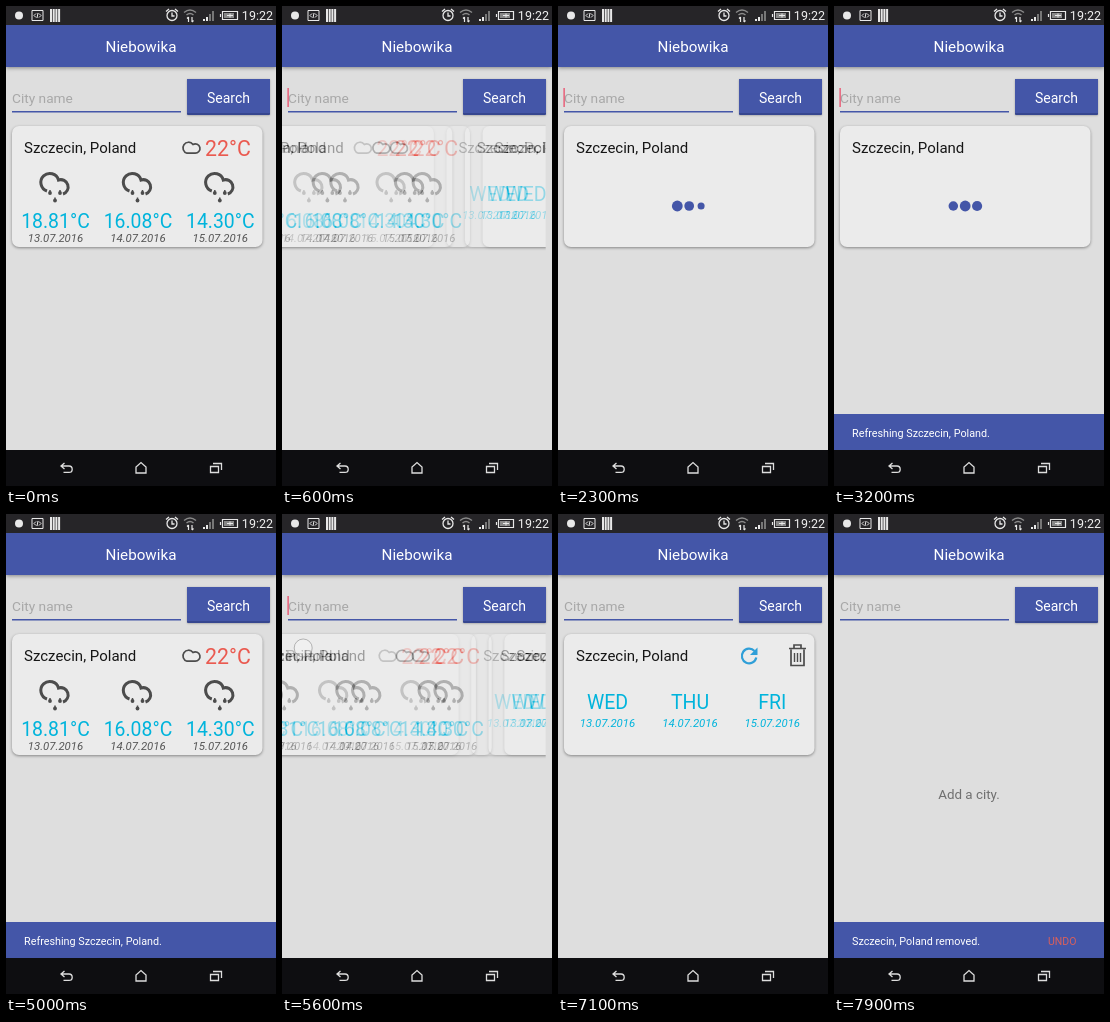
Write an HTML page with a canvas that moves like this. It is 270 px wide and 480 px high and loops after 8 s.

```html
<!DOCTYPE html>
<html lang="en">
<head>
<meta charset="utf-8">
<style>
html, body { margin: 0; height: 100%; overflow: hidden; background: #000; }
canvas { display: block; width: 270px; height: 480px; }
</style>
</head>
<body>
<canvas id="stage"></canvas>
<script>
const LOOP = 8000, PAGE = 263;
const BLUE = '#4456a8', CYAN = '#00b4dc', RED = '#ea5a50', DARK = '#4c4c4c', PAPER = '#dedede';
const COLUMNS = [49.5, 132, 214.3];
const DATES = ['13.07.2016', '14.07.2016', '15.07.2016'];
const TEMPS = ['18.81°C', '16.08°C', '14.30°C'];
const DAYS = ['WED', 'THU', 'FRI'];
const SWIPES = [450, 5473], SWIPE_MS = 350;
const REFRESH = 2300, LOADED = 4100, REMOVED = 7250;

const ratio = window.devicePixelRatio || 1;

function context(canvas) {
  canvas.width = 270 * ratio;
  canvas.height = 480 * ratio;
  const result = canvas.getContext('2d');
  result.scale(ratio, ratio);
  return result;
}

const screen2d = context(document.getElementById('stage'));
const layer2d = context(document.createElement('canvas'));
let ctx = screen2d;

const clamp = u => Math.max(0, Math.min(1, u));
const smooth = u => u * u * (3 - 2 * u);

function text(str, x, y, size, color, align = 'left', style = '') {
  ctx.font = `${style} ${size}px Roboto, sans-serif`;
  ctx.textAlign = align;
  ctx.fillStyle = color;
  ctx.fillText(str, x, y);
}

function rect(x, y, w, h, color) {
  ctx.fillStyle = color;
  ctx.fillRect(x, y, w, h);
}

function round(x, y, w, h, r, color) {
  ctx.beginPath();
  ctx.roundRect(x, y, w, h, r);
  ctx.fillStyle = color;
  ctx.fill();
}

function dot(x, y, r, color) {
  ctx.beginPath();
  ctx.arc(x, y, r, 0, 7);
  ctx.fillStyle = color;
  ctx.fill();
}

function line(d, color, width) {
  ctx.strokeStyle = color;
  ctx.lineWidth = width;
  ctx.stroke(new Path2D(d));
}

function at(x, y, draw) {
  ctx.save();
  ctx.translate(x, y);
  draw();
  ctx.restore();
}

function shadowed(blur, dy, color, draw) {
  ctx.save();
  ctx.shadowBlur = blur * ratio;
  ctx.shadowOffsetY = dy * ratio;
  ctx.shadowColor = color;
  draw();
  ctx.restore();
}

function statusBar() {
  const white = '#e8e8e8';
  rect(0, 0, 270, 19, '#262528');
  dot(13, 9.5, 4, white);
  line('M26 4.5h11v10h-11zM30 7.5l-2 2 2 2M33 7.5l2 2-2 2M32 7l-1 5', white, 1);
  for (let x = 44; x < 54; x += 2.7) rect(x, 3, 2, 13, white);
  line('M161 9.5a5 5 0 1 0 10 0a5 5 0 1 0-10 0M166 6.5v3.5h2.5M160 5.5l3-2.5M172 5.5l-3-2.5', white, 1.3);
  line('M178 6.5q6-5 12 0M180.5 9q3.5-3 7 0', '#8a8a8a', 1.4);
  line('M182.5 11v5M181 12.5l1.5-1.5M186 11v5M187.5 14.5l-1.5 1.5', white, 1.2);
  [2, 4, 7, 10].forEach((h, i) => rect(197 + i * 3, 15 - h, 2, h, i < 2 ? white : '#777'));
  line('M216.5 5.5h15v8h-15zM214.5 8v3', white, 1.2);
  rect(218, 7, 10, 5, '#888');
  line('M221 9.5h6M224 7.5v4', white, 1);
  text('19:22', 267, 14, 12.5, '#f0f0f0', 'right');
}

function navBar() {
  rect(0, 444, 270, 36, '#0e0e11');
  line('M58.5 457l-3.5 3 3.5 3M55 460h8a3.2 3.2 0 0 1 0 6.4h-5.5', '#ddd', 1.3);
  line('M130 467v-6l5-4.5 5 4.5v6z', '#ddd', 1.3);
  line('M204.5 460.5h8v6h-8zM207 457.5h8.5v6.5', '#ddd', 1.3);
}

function header(t) {
  shadowed(4, 1, 'rgba(0,0,0,.4)', () => rect(0, 19, 270, 42, BLUE));
  text('Niebowika', 135, 46, 15.2, '#fff', 'center');
  text('City name', 6, 96.5, 13.7, '#a8a8a8');
  rect(6, 105, 169, 1.5, BLUE);
  const blink = t % 1000;
  if (blink >= 150 && blink < 650) rect(5.5, 82, 1.2, 19, '#ec4060');
  shadowed(2, .5, 'rgba(0,0,0,.3)', () => round(181, 73, 83, 36, 1, '#36468f'));
  rect(181, 73, 83, 34, BLUE);
  text('Search', 222.5, 96.5, 14, '#fff', 'center');
}

function rain(x) {
  at(x - .5, 178, () => {
    line('M-8 7A9 9 0 1 1 3.5-4A7.2 7.2 0 1 1 8 10', DARK, 3);
    [[-5, 9], [5, 9], [0, 16.5]].forEach(([dx, dy]) => {
      dot(dx, dy, 1.9, DARK);
      line(`M${dx} ${dy - 3}v3`, DARK, 1.5);
    });
  });
}

function card() {
  shadowed(3, 1, 'rgba(0,0,0,.4)', () => round(6, 120, 250.5, 121, 7, '#ebebeb'));
  text('Szczecin, Poland', 18, 147, 15, '#161616');
}

function front() {
  card();
  line('M181 147.2A5.6 5.6 0 1 1 187 138.4A4.7 4.7 0 1 1 189 147.2z', DARK, 1.7);
  text('22°C', 199, 150, 21.3, RED);
  COLUMNS.forEach((x, i) => {
    rain(x);
    text(TEMPS[i], x, 221.5, 19.4, CYAN, 'center');
    text(DATES[i], x, 236, 11.4, '#555', 'center', 'italic');
  });
}

function back() {
  card();
  line('M196.5 137a7.3 7.3 0 1 0 1.8 6.5', '#2f9fd8', 2.2);
  ctx.fillStyle = '#2f9fd8';
  ctx.fill(new Path2D('M199.5 133.5v7.5h-7.5z'));
  line('M233 135.5v16h13v-16M231 134.5h17M236 134v-3h7v3', DARK, 1.7);
  line('M236.5 139v9M239.5 139v9M242.5 139v9', DARK, 1.4);
  COLUMNS.forEach((x, i) => {
    text(DAYS[i], x, 195, 19.5, CYAN, 'center');
    text(DATES[i], x, 213, 11.4, CYAN, 'center', 'italic');
  });
}

function loading(t) {
  card();
  for (let i = 0; i < 3; i++) {
    const phase = ((t - 3060 - i * 120) / 750 % 1 + 1) % 1;
    const eased = (1 - Math.cos(Math.PI * phase)) / 2;
    const scale = 1 - .7 * (1 - Math.abs(1 - 2 * eased));
    dot(119.3 + i * 11.9, 200, 5.4 * scale, BLUE);
  }
}

function swipe(t) {
  const start = t < REFRESH ? SWIPES[0] : SWIPES[1];
  return -PAGE * smooth(clamp((t - start) / SWIPE_MS));
}

function pages(x) {
  if (x > -PAGE) at(x, 0, front);
  if (x < 0) at(x + PAGE, 0, back);
}

function touch(x) {
  ctx.beginPath();
  ctx.arc(x, 134, 9, 0, 7);
  ctx.fillStyle = 'rgba(255,255,255,.25)';
  ctx.fill();
  ctx.strokeStyle = 'rgba(90,90,90,.4)';
  ctx.lineWidth = 1;
  ctx.stroke();
}

// Blends three nearby moments, the way the screen recording smears a drag.
function pager(t) {
  const now = swipe(t);
  const moving = now !== swipe(t - 34);
  const moments = moving ? [[34, 1], [17, .5], [0, .25]] : [[0, 1]];
  ctx.save();
  ctx.beginPath();
  ctx.rect(0, 115, PAGE + .5, 132);
  ctx.clip();
  for (const [lag, alpha] of moments) {
    ctx = layer2d;
    rect(0, 0, 270, 480, PAPER);
    pages(swipe(t - lag));
    ctx = screen2d;
    ctx.globalAlpha = alpha;
    ctx.drawImage(layer2d.canvas, 0, 0, 270, 480);
  }
  ctx.globalAlpha = 1;
  if (now < 0 && now > -92) touch(101 + now);
  ctx.restore();
}

function snackbar(t, from, to, message, action) {
  if (t < from || t > to + 250) return;
  const shown = (1 - (1 - clamp((t - from) / 250)) ** 3) * (1 - smooth(clamp((t - to) / 250)));
  at(0, 36 * (1 - shown), () => {
    rect(0, 408, 270, 36, BLUE);
    ctx.globalAlpha = clamp((t - from - 100) / 180);
    text(message, 18, 430.5, 10.8, '#fff');
    if (action) text(action, 228.2, 430.5, 10.5, '#d9605c', 'center');
    ctx.globalAlpha = 1;
  });
}

function draw(t) {
  rect(0, 0, 270, 480, PAPER);
  if (t >= REMOVED) text('Add a city.', 135, 285, 13.4, '#707070', 'center');
  else if (t >= REFRESH && t < LOADED) loading(t);
  else pager(t);
  header(t);
  snackbar(t, 2400, 5200, 'Refreshing Szczecin, Poland.');
  snackbar(t, 7300, 9000, 'Szczecin, Poland removed.', 'UNDO');
  statusBar();
  navBar();
}

function tick() {
  draw(performance.now() % LOOP);
  requestAnimationFrame(tick);
}
tick();
</script>
</body>
</html>
```
